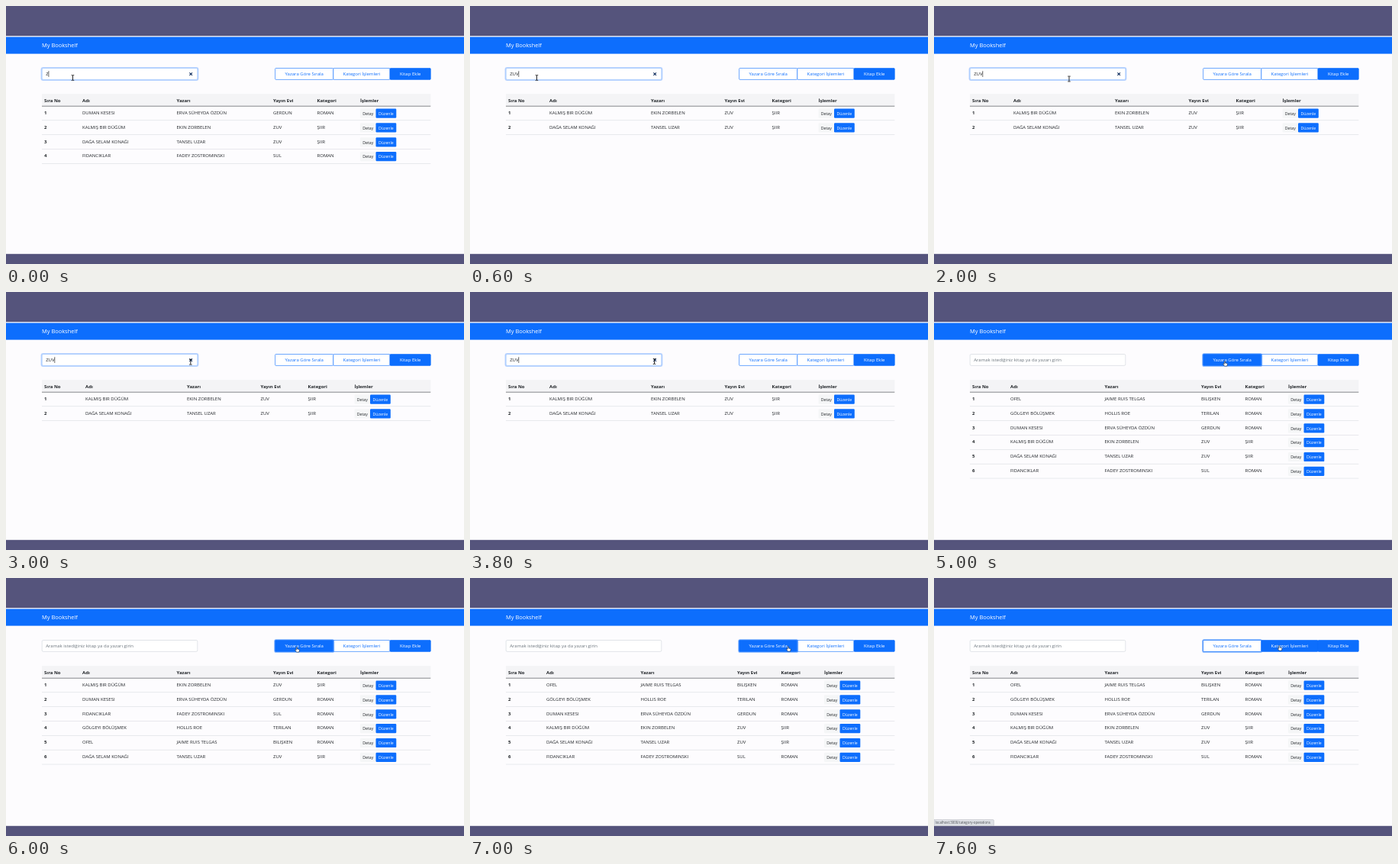
Recreate the animation shown at these times as an HTML page. Size 600x338 px, loop 8000 ms.

```html
<!DOCTYPE html>
<html lang="tr">
<head>
<meta charset="utf-8">
<title>My Bookshelf</title>
<style>
  html, body { margin: 0; width: 100%; height: 100%; overflow: hidden; background: #fdfcfe; }
  svg { display: block; width: 100%; height: 100%; }
  text { font: 6px "Open Sans", "Noto Sans", sans-serif; fill: #212529; white-space: pre; }
  .bold { font-weight: 700; }
  .small { font-size: 5.2px; }
  .mid { text-anchor: middle; }
</style>
</head>
<body>
<svg viewBox="0 0 600 338" xmlns="http://www.w3.org/2000/svg">
  <rect width="600" height="338" fill="#fdfcfe"/>
  <rect width="600" height="39.2" fill="#55547c"/>
  <rect y="40.5" width="600" height="22.1" fill="#0d6efd"/>
  <rect y="324.8" width="600" height="13.2" fill="#55547c"/>
  <text x="47" y="54.3" style="font-size:7.45px;fill:#fff">My Bookshelf</text>

  <rect id="inputGlow" x="46.4" y="80.7" width="205.2" height="16.5" rx="2.2" fill="none" stroke="#0d6efd" stroke-opacity=".28" stroke-width="1.6"/>
  <rect id="input" x="47.2" y="81.5" width="203.6" height="14.9" rx="1.6" fill="#fff" stroke-width=".6"/>
  <text id="query" x="52.2" y="91.4"></text>
  <rect id="caret" y="85" width=".6" height="8" fill="#111"/>
  <path id="clear" d="M240.4 87.3l3.6 3.6m0-3.6l-3.6 3.6" stroke="#0b2a5c" stroke-width="1.1"/>

  <g id="buttons"></g>
  <g id="table"></g>

  <g id="status">
    <path d="M0 316.6H77.2q1.2 0 1.2 1.2V324.6H0z" fill="#dee1e6" stroke="#b4b7bd" stroke-width=".5"/>
    <text x="1.6" y="321.9" style="font-size:4.4px;fill:#4a4d52">localhost:3000/category-operations</text>
  </g>

  <g id="pointer">
    <path id="beam" d="M-1.7-3.4H-.5L0-3 .5-3.4H1.7M0-3V3M-1.7 3.4H-.5L0 3 .5 3.4H1.7" fill="none" stroke="#111" stroke-width=".9"/>
    <path id="arrow" d="M0-3V4L1.6 2.6 2.7 5 3.7 4.5 2.6 2.2H4.8z" fill="#fff" stroke="#111" stroke-width=".5"/>
    <path id="hand" d="M-1.2-2.6Q-.6-3.5 0-2.6V-.4L2.3.1Q3 .4 2.9 1.2L2.3 3.6H-.9L-2.7 1Q-2.7.1-1.9.4L-1.2 1z" fill="#fff" stroke="#111" stroke-width=".5"/>
  </g>
</svg>
<script>
const LOOP = 8000, STEP = 200, BLINK = 530;
const BLUE = '#0d6efd';
const HEADS = ['Sıra No', 'Adı', 'Yazarı', 'Yayın Evi', 'Kategori', 'İşlemler'];
const WIDE = [50, 100, 223.5, 350, 407.5, 464];
const NARROW = [50, 104, 237, 333.5, 395.5, 456.5];
const BOOKS = [
  ['OFEL', 'JAIME RUIS TELGAS', 'BILIŞKEN', 'ROMAN'],
  ['GÖLGEYI BÖLÜŞMEK', 'HOLLIS ROE', 'TERILAN', 'ROMAN'],
  ['DUMAN KESESI', 'ERVA SÜHEYDA ÖZDÜN', 'GERDUN', 'ROMAN'],
  ['KALMIŞ BIR DÜĞÜM', 'EKIN ZORBELEN', 'ZUV', 'ŞIIR'],
  ['DAĞA SELAM KONAĞI', 'TANSEL UZAR', 'ZUV', 'ŞIIR'],
  ['FIDANCIKLAR', 'FADEY ZOSTROMINSKI', 'SUL', 'ROMAN']
];
const BUTTONS = [
  ['Yazara Göre Sırala', 352.6, 428.8],
  ['Kategori İşlemleri', 428.8, 503],
  ['Kitap Ekle', 503, 556.3]
];
// time, x, y
const PATH = [
  [0, 87.5, 94], [1400, 87.5, 94], [2000, 177, 95.5], [2600, 242, 92], [3800, 241.5, 91],
  [4000, 241.5, 91], [4800, 381.5, 93.5], [6600, 381.5, 93.5], [7400, 453, 91.5], [LOOP, 453, 91.5]
];

const $ = id => document.getElementById(id);
const show = (id, on) => $(id).setAttribute('visibility', on ? 'visible' : 'hidden');
const rect = (x, y, w, h, fill, extra = '') =>
  `<rect x="${x}" y="${y}" width="${w}" height="${h}" fill="${fill}" ${extra}/>`;
const label = (x, y, s, cls = '', fill = '#212529') =>
  `<text x="${x}" y="${y}" class="${cls}" style="fill:${fill}">${s}</text>`;

function pointerAt(t) {
  const i = PATH.findIndex(p => p[0] > t);
  const [t0, x0, y0] = PATH[i - 1], [t1, x1, y1] = PATH[i];
  const k = (t - t0) / (t1 - t0);
  const e = t0 === 1400 || t0 === 2000 ? k : k * k * (3 - 2 * k);
  return [x0 + (x1 - x0) * e, y0 + (y1 - y0) * e];
}

function tableMarkup(query, sorted) {
  const books = BOOKS.filter(b => b.some(s => s.includes(query)));
  if (sorted) books.sort((a, b) => a[1] < b[1] ? -1 : 1);
  const cols = books.length < 3 ? NARROW : WIDE;
  let out = rect(47, 115.2, 509.3, 16, '#f4f4f6');
  HEADS.forEach((h, i) => out += label(cols[i], 125.6, h, 'bold'));
  books.forEach((book, r) => {
    const y = 131.2 + r * 18.85, x = cols[5];
    out += label(cols[0], y + 10.7, r + 1, 'bold');
    book.forEach((s, i) => out += label(cols[i + 1], y + 10.7, s));
    out += rect(x, y + 3.3, 20.4, 12.2, '#f5f6f7', 'rx="1.2"')
      + label(x + 10.3, y + 11.6, 'Detay', 'small mid')
      + rect(x + 20.5, y + 3.3, 26.8, 12.2, BLUE, 'rx="1.2"')
      + label(x + 33.9, y + 11.6, 'Düzenle', 'small mid', '#fff')
      + rect(47, y + 18.3, 509.3, .6, '#dadde2');
  });
  return out + rect(47, 130.8, 509.3, .7, '#55585c');
}

function buttonMarkup(hover, focus) {
  let out = '';
  BUTTONS.forEach(([name, x0, x1], i) => {
    const solid = i === 2 || i === hover;
    out += rect(x0, 81.5, x1 - x0, 14.9, solid ? BLUE : '#fff', `rx="1" stroke="${BLUE}" stroke-width=".6"`)
      + label((x0 + x1) / 2, 91.4, name, 'mid', solid ? '#fff' : BLUE);
  });
  if (focus) {
    const [, x0, x1] = BUTTONS[0];
    out += rect(x0 - .6, 80.9, x1 - x0 + 1.2, 16.1, 'none', `rx="1.8" stroke="${BLUE}" stroke-opacity=".55" stroke-width="1.5"`);
  }
  return out;
}

function draw(t) {
  const query = t < 200 ? 'Z' : t < 600 ? 'ZU' : t < 4000 ? 'ZUV' : '';
  const focused = t < 5000;
  const sorted = t >= 5200 && t < 6200;
  const [x, y] = pointerAt(t);
  const hover = BUTTONS.findIndex(b => x >= b[1] && x < b[2]);

  $('query').textContent = query || 'Aramak istediğiniz kitap ya da yazarı girin';
  $('query').style.fill = query ? '#212529' : '#6c757d';
  $('caret').setAttribute('x', 52.2 + (query ? $('query').getComputedTextLength() : 0));
  const lastKey = t < 600 ? t : t < 4000 ? 600 : 4000;
  show('caret', focused && (t - lastKey) % (2 * BLINK) < BLINK);
  show('clear', query);
  show('inputGlow', focused);
  $('input').setAttribute('stroke', focused ? '#86b7fe' : '#ced4da');

  $('buttons').innerHTML = buttonMarkup(hover, !focused);
  $('table').innerHTML = tableMarkup(query, sorted);
  show('status', hover === 1);

  $('pointer').setAttribute('transform', `translate(${x} ${y})`);
  show('beam', x < 251);
  show('hand', hover >= 0);
  show('arrow', x >= 251 && hover < 0);
}

let last = -1;
function tick(now) {
  const t = Math.floor(now % LOOP / STEP) * STEP;
  if (t !== last) draw(last = t);
  requestAnimationFrame(tick);
}
draw(0);
requestAnimationFrame(tick);
</script>
</body>
</html>
```
